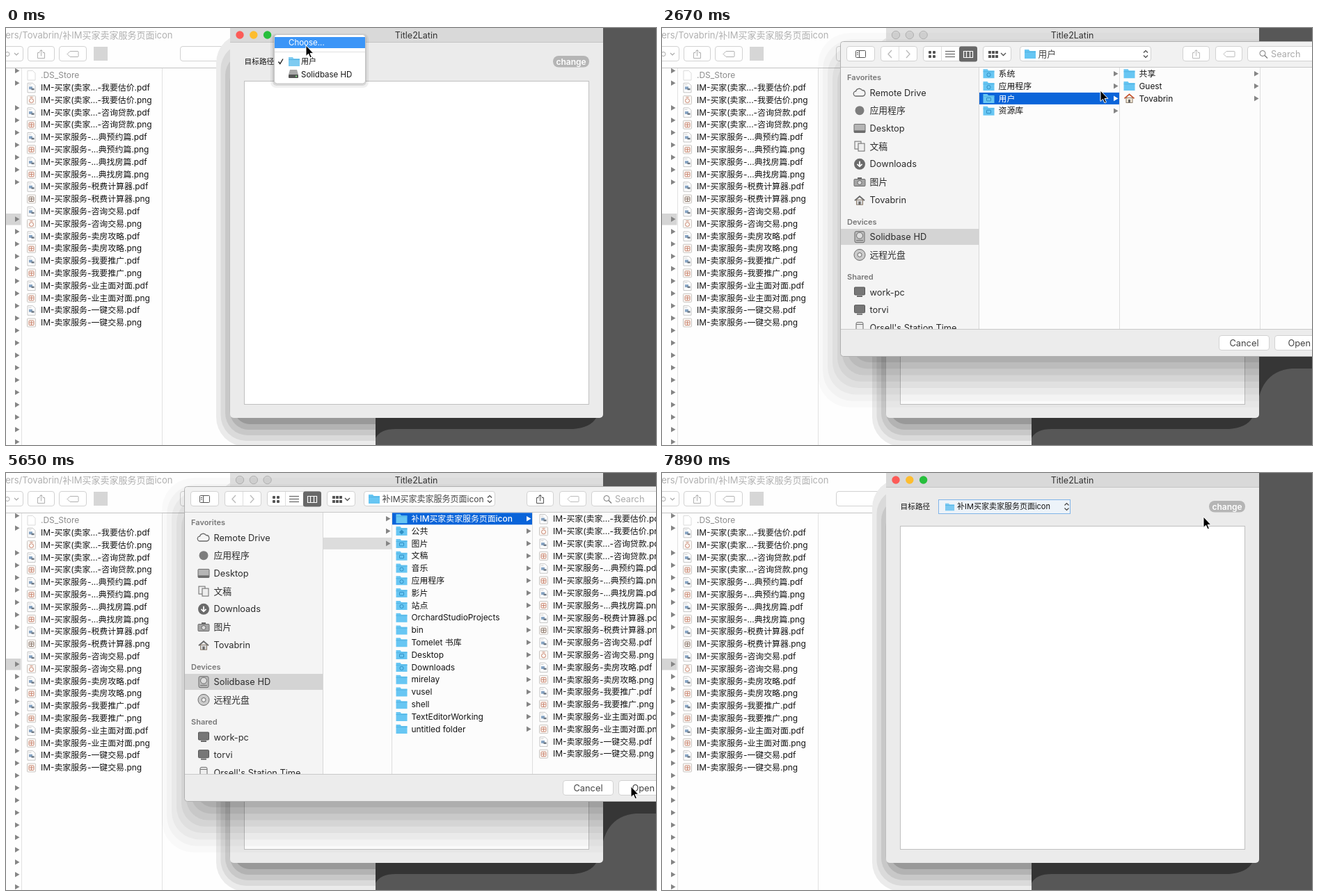
Animation, 934 px wide and 600 px high, one loop 8 s. Source, as an HTML page:

```html
<!DOCTYPE html>
<html lang="zh-CN">
<head>
<meta charset="utf-8">
<title>Folder picker</title>
<style>
html, body { margin: 0; width: 100%; height: 100%; overflow: hidden; background: #575757; }
svg { display: block; width: 934px; height: 600px; }
text { font-family: Inter, "Noto Sans CJK SC", "Noto Sans CJK", sans-serif; white-space: pre; }
</style>
</head>
<body>
<svg id="stage" viewBox="0 0 934 600" xmlns="http://www.w3.org/2000/svg">
  <defs>
    <clipPath id="finder"><rect width="531" height="600"/></clipPath>
    <clipPath id="left"><rect width="858" height="600"/></clipPath>
    <clipPath id="cols"><rect x="456" y="57" width="478" height="376"/></clipPath>
    <clipPath id="side"><rect x="257" y="57" width="198" height="376"/></clipPath>
  </defs>
  <g id="back"></g>
  <g id="front"></g>
  <path id="cursor" d="M0 0V15.5L3.6 12.2 6 17.8 8.4 16.8 6 11.4H10.8Z" fill="#000" stroke="#fff"/>
</svg>
<script>
const LOOP = 8000, ROW = 17.8, COL = 202;
const USER = 'Tovabrin', DISK = 'Solidbase HD', TARGET = '补IM买家卖家服务页面icon';

// time, pointer x, pointer y, view, open level, column scroll
const steps = [
  [0, 431, 25, 'menu'], [300, 430, 28, 'main'], [450, 429, 60, 'main'],
  [590, 428, 95, 'main'], [740, 428, 121, 'main'],
  [1040, 428, 121, 'panel', 0, 0], [1340, 462, 118, 'panel', 0, 0],
  [1490, 505, 112, 'panel', 0, 0], [1640, 532, 107, 'panel', 0, 0],
  [1930, 532, 107, 'panel', 1, 0],
  [2520, 570, 98, 'panel', 1, 0], [2670, 630, 90, 'panel', 1, 0],
  [2820, 695, 92, 'panel', 1, 0], [2970, 738, 100, 'panel', 1, 0],
  [3270, 738, 100, 'panel', 2, 40], [3410, 738, 100, 'panel', 2, 103],
  [3710, 760, 92, 'panel', 2, 103], [3860, 790, 80, 'panel', 2, 103],
  [4010, 815, 70, 'panel', 2, 103], [4310, 836, 64, 'panel', 2, 103],
  [4610, 836, 64, 'panel', 3, 170], [4760, 838, 70, 'panel', 3, 305],
  [4910, 845, 110, 'panel', 3, 305], [5060, 862, 220, 'panel', 3, 305],
  [5210, 880, 330, 'panel', 3, 305], [5360, 893, 410, 'panel', 3, 305],
  [5500, 897, 442, 'panel', 3, 305], [5650, 898, 451, 'panel', 3, 305],
  [6240, 898, 451, 'blank'], [6390, 898, 451, 'done'],
  [6840, 790, 340, 'done'], [6990, 711, 250, 'done'],
  [7440, 735, 160, 'done'], [7590, 764, 75, 'done'], [7890, 778, 63, 'done']
];

const rect = (x, y, w, h, fill, r = 0, stroke = 'none') =>
  `<rect x="${x}" y="${y}" width="${w}" height="${h}" rx="${r}" fill="${fill}" stroke="${stroke}"/>`;
const circle = (x, y, r, fill, stroke = 'none') =>
  `<circle cx="${x}" cy="${y}" r="${r}" fill="${fill}" stroke="${stroke}"/>`;
const line = (d, color, w = 1) =>
  `<path d="${d}" fill="none" stroke="${color}" stroke-width="${w}"/>`;
const shape = (d, fill) => `<path d="${d}" fill="${fill}"/>`;
const text = (x, y, s, size = 12, fill = '#141414', more = '') =>
  `<text x="${x}" y="${y + size * .36}" font-size="${size}" fill="${fill}" ${more}>${s}</text>`;
const clip = (id, s) => `<g clip-path="url(#${id})">${s}</g>`;
const bold = 'font-weight="600"', mid = 'text-anchor="middle"';

const arrow = (x, y, fill = '#858585') => shape(`M${x - 3} ${y - 3.8}l6.5 3.8-6.5 3.8z`, fill);
const chevrons = (x, y) => line(`M${x - 3} ${y - 2}l3-3 3 3M${x - 3} ${y + 2}l3 3 3-3`, '#444', 1.2);
const button = (x, y, w, h = 21, stroke = '#d2d2d2') => rect(x + .5, y + .5, w, h, '#fff', 3.5, stroke);
const share = (x, y, c) => line(`M${x - 2} ${y - 2}h-3v8h10v-8h-3M${x} ${y + 3}v-9m-3 3l3-3 3 3`, c);
const tag = (x, y, c) => line(`M${x - 8} ${y}l4-4h11q1 0 1 1v6q0 1-1 1h-11z`, c);

function folder(x, y, badge = '', fill = '#67c6f3') {
  let s = shape(`M${x} ${y - 6.5}h6l1.5 2H${x + 16}v11H${x}z`, fill) + line(`M${x} ${y - 3}h16`, '#52b3e2');
  if (badge === 'o') s += circle(x + 8, y + 1.5, 2.6, 'none', '#2f8fc4');
  if (badge === 'r') s += rect(x + 5, y - 1, 6, 4.5, 'none', .5, '#2f8fc4');
  if (badge === 'd') s += shape(`M${x + 8} ${y - 2}l3.5 3.5-3.5 3.5-3.5-3.5z`, '#2f8fc4');
  return s;
}
const house = (x, y, wall = '#f4e9d8', roof = '#c5532c') =>
  rect(x - 4.5, y - 1, 9, 7, wall, 0, '#8a7a68') + rect(x - 1.5, y + 1.5, 3, 4.5, '#666') +
  line(`M${x - 7} ${y}l7-6 7 6`, roof, 1.8);
const disk = (x, y) =>
  shape(`M${x - 5} ${y - 6}h10l2 7h-14z`, '#a9a9a9') + rect(x - 7, y + 1, 14, 5, '#555', 1) + circle(x + 4, y + 3.5, 1, '#8f8');

const pairs = ['买家(卖家...-我要估价', '买家(卖家...-咨询贷款', '买家服务-...典预约篇', '买家服务-...典找房篇',
  '买家服务-税费计算器', '买家服务-咨询交易', '卖家服务-卖房攻略', '卖家服务-我要推广',
  '卖家服务-业主面对面', '卖家服务-一键交易'];
const files = pairs.flatMap(n => [`IM-${n}.pdf`, `IM-${n}.png`]);

const page = (x, y, edge = '#c4c4c4') =>
  `<path d="M${x - 5.5} ${y - 6.5}h7.5l3.5 3.5v10h-11z" fill="#fff" stroke="${edge}"/>`;
function fileIcon(x, y, i) {
  if (i % 2 === 0)
    return page(x, y) + rect(x - 3.5, y - 1.5, 5, 4, '#86a3c2') + rect(x, y + 1, 4, 2.5, '#6d7884') + line(`M${x - 4} ${y - 4}h4`, '#ccc');
  const c = i === 9 ? '#877468' : '#c98670', k = (i - 1) / 2;
  let s = rect(x - 6, y - 6, 12, 12, '#fbf7f4', 1, '#c9c6c3');
  if (k % 5 === 0) s += circle(x, y + 1, 3, 'none', c) + line(`M${x - 2} ${y - 4}h4`, c);
  else s += rect(x - 3.5, y - 3, 7, 6.5, 'none', 1, c) + line(`M${x - 3} ${y}h6M${x} ${y - 2}v5`, c);
  return s;
}
const fileRows = (x, y) => files.map((n, i) =>
  fileIcon(x, y + i * ROW, i) + text(x + 13.5, y + i * ROW, n, 11.9)).join('');

function backdrop() {
  let s = rect(0, 0, 934, 600, '#575757') + rect(0, 0, 531, 600, '#fefefe');
  s += text(239.5, 10, `ers/${USER}/${TARGET}`, 13, '#b0b0b0', 'text-anchor="end"');
  s += button(-10, 26, 34) + circle(2, 37.5, 3, 'none', '#aaa') + line('M12 36l3 3 3-3', '#aaa', 1.2);
  s += button(31, 26, 38) + share(50.5, 37.5, '#b0b0b0') + button(76, 26, 39) + tag(96, 37.5, '#b0b0b0');
  s += rect(126, 27, 20, 20, '#d6d6d6') + button(250, 26, 90);
  s += line('M0 57.5H531', '#c4c4c4') + line('M22.5 58V600M224.5 58V600', '#e2e2e2');
  s += rect(0, 267, 21.5, 16.5, '#d5d5d5');
  for (let k = 0; k < 31; k++) if (![2, 10, 11].includes(k)) s += arrow(16, 61.5 + k * ROW);
  s += page(36.5, 68, '#dcdcdc') + text(50, 68, '.DS_Store', 12, '#8c8c8c') + fileRows(36.5, 68 + ROW);
  const bands = ['#ebebeb', '#dadada', '#c8c8c8', '#b3b3b3', '#999'].map((c, i) => {
    const top = 8 + i * 14;
    return rect(302 + i * 6.5, top, 600, 602 - i * 8 - top, c, 42 - i * 5);
  });
  s += clip('finder', bands.join(''));
  return s + shape('M531 561H848Q840 575 815 577H560Q538 577 531 590Z', '#343434');
}

function mainWindow(view) {
  const off = view === 'panel';
  let s = rect(322, -8, 536, 569, '#ebebeb', 5) + rect(322, 0, 536, 20, off ? '#e0e0e0' : '#d9d9d9') + line('M322 20.5H858', '#c4c4c4');
  ['#fc5b57', '#fdbd2f', '#27bf3c'].forEach((c, i) =>
    s += circle(336 + i * 19.8, 10, 5.7, off ? '#d2d2d2' : c, off ? '#b4b4b4' : 'none'));
  s += text(589.5, 10, 'Title2Latin', 12.5, '#333', mid);
  s += text(342.5, 48.5, '目标路径', 10.7) + rect(786, 40, 52, 16.5, '#b5b5b5', 8) + text(812, 48.5, 'change', 12, '#fff', mid + ' ' + bold);
  const done = view === 'done', w = done ? 190 : 79;
  s += rect(397.5, 38.5, w - 1, 20, '#edf3f9', 0, '#80b4e8');
  s += `<g transform="translate(407 49) scale(.82)">${folder(0, 0, '', done ? '#7cc9f2' : '#2f6375')}</g>`;
  s += text(424, 48.5, done ? TARGET : '用户', 11) + chevrons(397 + w - 5.5, 48.5);
  return s + rect(342.5, 76.5, 495, 465, '#fff', 0, '#c0c0c0');
}

function menu() {
  let s = rect(380, 8, 141, 78, 'rgba(0,0,0,.06)', 8) + rect(383, 9, 135, 74, 'rgba(0,0,0,.1)', 6);
  s += rect(385.5, 9.5, 131, 70.5, '#fff', 4, '#c6c6c6') + rect(386, 13, 130, 16, '#3b95f7');
  s += text(406, 21, 'Choose...', 11.5, '#fff') + line('M386 34.5H516', '#e0e0e0');
  s += line('M391.5 48.5l2.3 3 4.2-7', '#222', 1.4) + folder(406, 48.5, '', '#7ecbf1') + text(424, 48.5, '用户', 11);
  return s + disk(413, 66) + text(424, 66.5, DISK, 11.5);
}

// name and folder badge; the badge "h" is the home folder
const lists = [
  [['系统', 'o'], ['应用程序', 'o'], ['用户', 'r'], ['资源库', 'r']],
  [['共享'], ['Guest'], [USER, 'h']],
  [[TARGET], ['公共', 'd'], ['图片', 'r'], ['文稿', 'r'], ['音乐', 'o'], ['应用程序', 'o'], ['影片', 'r'], ['站点', 'o'],
    ['OrchardStudioProjects'], ['bin'], ['Tomelet 书库'], ['Desktop', 'r'], ['Downloads', 'o'], ['mirelay'], ['vusel'],
    ['shell'], ['TextEditorWorking'], ['untitled folder']]
];
const chosen = [2, 2, 0];

function columns(level, scroll) {
  let s = '';
  for (let c = 0; c <= level; c++) {
    const x = 455.5 + c * COL - scroll;
    s += line(`M${x + COL} 57V433`, '#dedede');
    if (c === 3) { s += fileRows(x + 16, 66); continue; }
    lists[c].forEach(([name, badge], i) => {
      const y = 65.8 + i * ROW, sel = c < level && i === chosen[c], hot = sel && c === level - 1;
      if (sel) s += rect(x + .5, y - 8.5, COL - 1, 17, hot ? '#0a64d9' : '#dcdcdc');
      s += badge === 'h' ? house(x + 14, y) : folder(x + 6, y, badge);
      s += text(x + 28, y, name, 11.9, hot ? '#fff' : '#141414', hot ? 'font-weight="500"' : '');
      s += arrow(x + 196.5, y, hot ? '#fff' : '#858585');
    });
  }
  return clip('cols', s);
}

function sideIcon(kind, x, y) {
  const c = '#6b6b6b';
  switch (kind) {
    case 'cloud': return line(`M${x - 5} ${y + 5}a3.5 3.5 0 0 1-.5-7a5 5 0 0 1 9-1.5a4.3 4.3 0 0 1 1 8.5z`, c, 1.3);
    case 'dot': return circle(x, y, 6.5, '#7d7d7d');
    case 'desk': return rect(x - 8, y - 6, 16, 12, '#b5b5b5', 1, c) + rect(x - 8, y + 3, 16, 3, c);
    case 'docs': return rect(x - 7, y - 7, 9, 11, '#eee', 0, c) + rect(x - 2, y - 4, 9, 11, '#eee', 0, c);
    case 'down': return circle(x, y, 8, c) + line(`M${x} ${y - 4}v7m-3.5-3l3.5 3.5 3.5-3.5`, '#fff', 1.8);
    case 'cam': return rect(x - 8, y - 4, 16, 10, '#a5a5a5', 1, c) + rect(x - 3, y - 6.5, 6, 3, c) + circle(x, y + 1, 3, '#ddd', c);
    case 'home': return house(x, y + 1, '#d5d5d5', c);
    case 'disk': return rect(x - 7, y - 8, 14, 16, '#bbb', 2, c) + circle(x, y - 2, 4.5, '#ddd', c) + line(`M${x - 5} ${y + 5}h10`, c);
    case 'disc': return circle(x, y, 8, '#ccc', c) + circle(x, y, 3, '#eee', c);
    case 'pc': return rect(x - 7.5, y - 7, 15, 11, '#777', 1, '#555') + rect(x - 4, y + 5, 8, 2, c);
    default: return rect(x - 5, y - 8, 10, 16, '#eee', 2, c) + line(`M${x - 5} ${y - 5}h10`, c);
  }
}
const places = [
  ['Favorites', 71, 93, [['cloud', 'Remote Drive'], ['dot', '应用程序'], ['desk', 'Desktop'], ['docs', '文稿'],
    ['down', 'Downloads'], ['cam', '图片'], ['home', USER]]],
  ['Devices', 279, 300.7, [['disk', DISK], ['disc', '远程光盘']]],
  ['Shared', 358, 380, [['pc', 'work-pc'], ['pc', 'torvi'], ['box', "Orsell's Station Time"]]]
];

function sidebar() {
  let s = rect(257, 289, 198, 23, '#d4d4d4');
  for (const [head, hy, y0, items] of places) {
    s += text(266, hy, head, 11, '#777', bold);
    items.forEach(([kind, name], i) => {
      const y = y0 + i * 25.7;
      s += sideIcon(kind, 284, y) + text(298.5, y, name, 12.8, '#2b2b2b');
    });
  }
  return clip('side', s);
}

function toolbar(level) {
  const c = '#555', soft = '#bcbcbc', on = level > 1 ? c : soft, y = 37.5;
  let s = button(265, 26, 40) + rect(278.5, 32.5, 14, 10, 'none', 1, c) + line('M283.5 33v9M280 35.5h2M280 38h2', c);
  s += button(314, 26, 52) + line('M340.5 27V48', '#ddd') + line('M330 32l-5 5.5 5 5.5M351 32l5 5.5-5 5.5', soft, 1.4);
  s += button(375, 26, 77) + line('M401.5 27V48', '#ddd') + rect(427, 26.5, 26, 22, '#686868', 3);
  for (let i = 0; i < 4; i++) s += rect(383 + i % 2 * 6, 33 + (i >> 1) * 6, 4, 4, c, 1);
  s += line('M407 33.5h14M407 37.5h14M407 41.5h14', c) + line('M433.5 33.5h13v9h-13zM437.5 33v9M442.5 33v9', '#fff', 1.2);
  s += button(461, 26, 40);
  for (let i = 0; i < 6; i++) s += rect(469 + i % 3 * 5, 33 + (i > 2) * 6, 4, 4, c);
  s += line('M487 36l3.5 3.5 3.5-3.5', c, 1.4);
  s += button(514, 26, 188) + chevrons(695, y);
  s += [disk(528, y), folder(521, y), house(528, y), folder(521, y)][level];
  s += text(540.5, y, [DISK, '用户', USER, TARGET][level], level === 3 ? 12 : 12.8, '#444');
  s += button(748, 26, 38) + share(767.5, y, on) + button(795, 26, 38) + tag(815, y, soft);
  s += button(841, 26, 130) + circle(863, 36.5, 4, 'none', '#777') + line('M866 39.5l4 4', '#777', 1.3);
  return s + text(875, y, 'Search', 12.8, '#aaa');
}

// stepped shadow: wide and faint outside, mostly below the panel
function panelShadow() {
  let s = '';
  for (let i = 0; i < 8; i++) {
    const reach = 33 - i * 7, top = 50 - reach * 1.3;
    s += rect(257 - reach, top, 800, 546 - i * 9.3 - top, `rgba(0,0,0,${.02 + i * .008})`, 46 - i * 3);
  }
  return clip('left', s) + shape('M858 472H934V490H905Q868 493 858 530Z', '#363636');
}

function panel(level, scroll) {
  let s = panelShadow();
  s += rect(256.5, 19.5, 740, 453, '#ececec', 4, '#b0b0b0') + rect(257, 20, 690, 36, '#f1f1f1', 4);
  s += rect(257, 57, 198, 376, '#f4f4f4') + rect(456, 57, 478, 376, '#fcfcfc');
  s += sidebar() + columns(level, scroll);
  s += line('M257 56.5H934M257 433.5H934', '#c9c9c9') + line('M455.5 57V433', '#d8d8d8') + toolbar(level);
  s += button(800, 442, 72) + text(836.5, 453, 'Cancel', 12.8, '#444', mid);
  return s + button(880, 442, 72) + text(899.5, 453, 'Open', 12.8, '#444');
}

function scene([, , , view, level, scroll]) {
  let s = mainWindow(view);
  if (view === 'menu') s += menu();
  if (view === 'panel') s += panel(level, scroll);
  if (view === 'blank') s += rect(202, 0, 732, 552, '#fefefe');
  return s;
}

const $ = id => document.getElementById(id);
$('back').innerHTML = backdrop();
let shown = '';
function draw(now) {
  const t = now % LOOP;
  const step = steps.filter(p => p[0] <= t).pop();
  const key = step.slice(3).join();
  if (key !== shown) {
    $('front').innerHTML = scene(step);
    shown = key;
  }
  $('cursor').setAttribute('transform', `translate(${step[1]} ${step[2]})`);
}
const start = performance.now();
function tick() {
  draw(performance.now() - start);
  requestAnimationFrame(tick);
}
tick();
</script>
</body>
</html>
```
